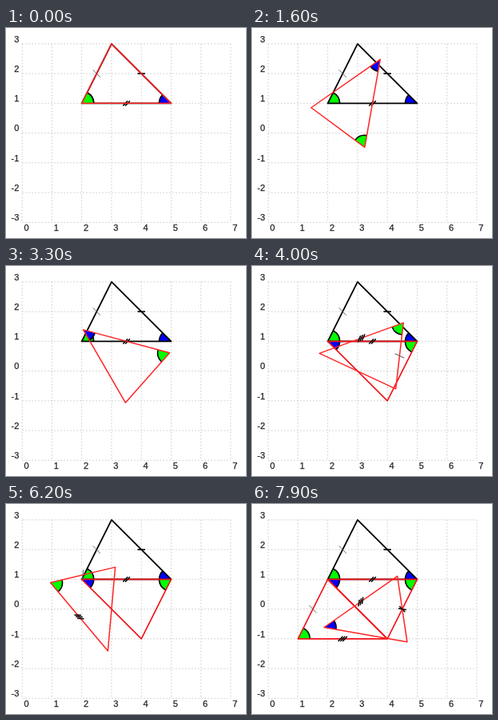
These frames come from a looping animation (300 by 263 pixels, 8 s). An HTML page:

```html
<!DOCTYPE html>
<html lang="en">
<head>
<meta charset="utf-8">
<title>Triangle rotations</title>
<style>
html, body { margin: 0; width: 100%; height: 100%; overflow: hidden; background: #fff; }
svg { display: block; }
text { font: 11px "Liberation Sans", Arial, sans-serif; fill: #222; stroke: #222; stroke-width: .25px; }
</style>
</head>
<body>
<svg id="stage" width="300" height="263" viewBox="0 0 300 263"></svg>
<script>
const UNIT = 37.25, FRAME = 100, LOOP = 8000, TURN = 3600, STEP = 5;
const svg = document.getElementById('stage');
const RED = '#f01018', MOVING = '#ff2424', BLACK = '#000';
const GREEN = '#0f0', BLUE = '#00f', GREY = '#666';

const px = x => 20.2 + UNIT * x;
const py = y => 131.6 - UNIT * y;
const mid = (p, q) => [(p[0] + q[0]) / 2, (p[1] + q[1]) / 2];
const polar = (x, y, r, deg) => {
  const a = deg * Math.PI / 180;
  return [x + r * Math.cos(a), y - r * Math.sin(a)];
};

function add(parent, name, attrs, text) {
  const el = document.createElementNS('http://www.w3.org/2000/svg', name);
  for (const key in attrs) el.setAttribute(key, attrs[key]);
  if (text !== undefined) el.textContent = text;
  parent.appendChild(el);
  return el;
}

const group = () => add(svg, 'g', { fill: 'none' });

function line(parent, a, b, attrs) {
  return add(parent, 'line', { x1: a[0], y1: a[1], x2: b[0], y2: b[1], ...attrs });
}

function triangle(parent, points, color, width = 1.6) {
  add(parent, 'polygon', {
    points: points.map(([x, y]) => px(x) + ',' + py(y)).join(' '),
    stroke: color, 'stroke-width': width, 'stroke-linejoin': 'round'
  });
}

// Filled angle mark between two directions, counter-clockwise
function angleMark(parent, [x, y], from, to, color) {
  const cx = px(x), cy = py(y);
  const a = polar(cx, cy, 15, from), b = polar(cx, cy, 15, to);
  const arc = `A15 15 0 0 0 ${b}`;
  add(parent, 'path', { d: `M${cx} ${cy}L${a}${arc}Z`, fill: color });
  add(parent, 'path', { d: `M${a}${arc}`, stroke: BLACK, 'stroke-width': 1.6 });
}

// Slanted strokes across the middle of a side
function ticks(parent, p, q, { count = 1, slant = 47, size = 8.5, color = BLACK, width = 1.5 } = {}) {
  const [mx, my] = mid(p, q);
  const side = Math.atan2(q[1] - p[1], q[0] - p[0]) * 180 / Math.PI;
  for (let i = 0; i < count; i++) {
    const [cx, cy] = polar(px(mx), py(my), (i - (count - 1) / 2) * 2.8, side);
    line(parent, polar(cx, cy, size / 2, side + slant), polar(cx, cy, -size / 2, side + slant),
      { stroke: color, 'stroke-width': width });
  }
}

const A = [2, 1], B = [5, 1], C = [3, 3], D = [4, -1], E = [1, -1];
const thin = { slant: 71, size: 13, color: GREY, width: 1 };

function drawGrid() {
  const dots = { stroke: '#c8c8c8', 'stroke-width': 1, 'stroke-dasharray': '1.5 2.5' };
  for (let x = 0; x <= 7; x++) {
    line(svg, [px(x), py(3)], [px(x), py(-3)], dots);
    add(svg, 'text', { x: px(x) + 5.4, y: 253.8, 'text-anchor': 'middle' }, x);
  }
  for (let y = -3; y <= 3; y++) {
    line(svg, [px(0), py(y)], [px(7), py(y)], dots);
    add(svg, 'text', { x: 16.3, y: py(y) - 2.3, 'text-anchor': 'end' }, y);
  }
}

drawGrid();

const first = group();
angleMark(first, A, 0, 63.43, GREEN);
angleMark(first, B, 135, 180, BLUE);
triangle(first, [A, B, C], BLACK, 1.8);
ticks(first, A, C, thin);
ticks(first, B, C, { slant: 45, size: 9.5, width: 1.6 });

const second = group();
angleMark(second, A, 315, 360, BLUE);
angleMark(second, B, 180, 243.43, GREEN);
triangle(second, [A, B, D], RED);

const third = group();
angleMark(third, E, 0, 63.43, GREEN);
triangle(third, [A, D, E], RED);
ticks(third, A, E, thin);
ticks(third, E, D, { count: 3 });
ticks(third, D, B, { slant: 71, size: 10 });

ticks(group(), A, B, { count: 2 });

const spinFirst = group();
angleMark(spinFirst, A, 0, 63.43, GREEN);
angleMark(spinFirst, B, 135, 180, BLUE);
triangle(spinFirst, [A, B, C], MOVING, 1.5);

const spinSecond = group();
angleMark(spinSecond, B, 180, 243.43, GREEN);
triangle(spinSecond, [A, B, D], MOVING, 1.5);
ticks(spinSecond, D, B, thin);
ticks(spinSecond, A, B, { count: 3 });

const spinThird = group();
angleMark(spinThird, A, 315, 360, BLUE);
triangle(spinThird, [A, B, D], MOVING, 1.5);
ticks(spinThird, D, B, { slant: 71, size: 10 });
ticks(spinThird, A, B, { count: 3 });

const spins = [
  { el: spinFirst, pivot: mid(A, B) },
  { el: spinSecond, pivot: mid(A, D) },
  { el: spinThird, pivot: mid(B, D) }
];

const show = (el, on) => el.setAttribute('display', on ? 'inline' : 'none');

function render(ms) {
  const time = Math.floor((ms % LOOP) / FRAME) * FRAME;
  const stage = Math.floor(time / TURN);
  const angle = (time % TURN) / FRAME * STEP;
  show(second, stage >= 1);
  show(third, stage >= 2);
  spins.forEach(({ el, pivot }, i) => {
    show(el, i === stage);
    el.setAttribute('transform', `rotate(${-angle} ${px(pivot[0])} ${py(pivot[1])})`);
  });
}

const start = performance.now();
function loop() {
  render(performance.now() - start);
  requestAnimationFrame(loop);
}
loop();
</script>
</body>
</html>
```
